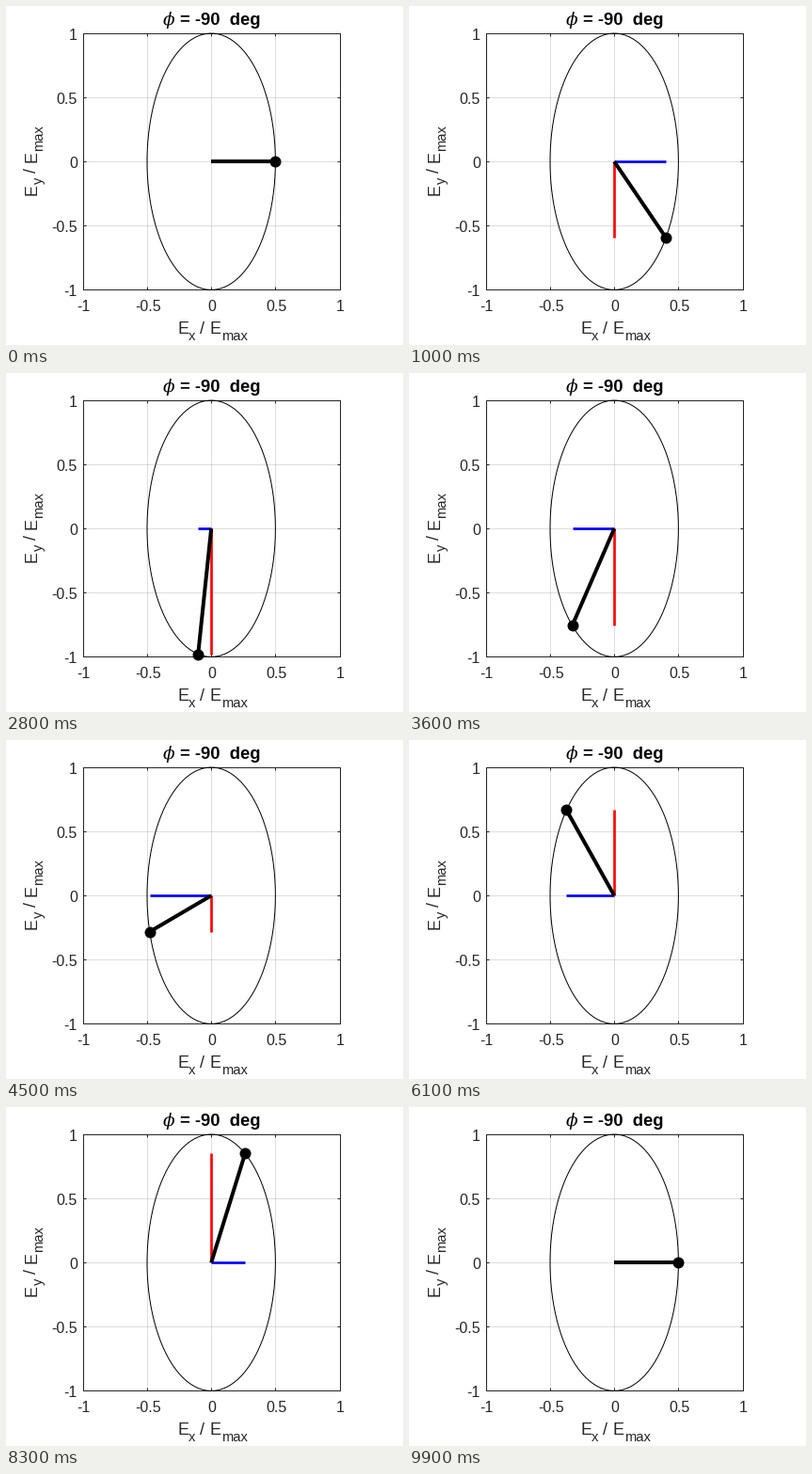
Animation of 422 by 360 pixels, one loop 10 s. Source, as a matplotlib script:

```python
import numpy as np
import matplotlib.pyplot as plt
from matplotlib.animation import FuncAnimation
from matplotlib.transforms import ScaledTranslation

W, H, DPI = 422, 360, 64
PX = 72 / DPI  # points per pixel
LEFT, TOP, RIGHT, BASE = 81.75, 29, 354.6, 301.45
STEPS = 100
INK = "#262626"
LABEL = 18 * PX

plt.rcParams.update({
    "font.family": "Liberation Sans",
    "axes.unicode_minus": False,
    "lines.solid_capstyle": "butt",
})

fig = plt.figure(figsize=(W / DPI, H / DPI), dpi=DPI, facecolor="white")
ax = fig.add_axes([LEFT / W, 1 - BASE / H,
                   (RIGHT - LEFT) / W, (BASE - TOP) / H])


def put(x, y, s, size=LABEL, **kw):
    """Place text with its baseline start at a pixel position, y downwards."""
    fig.text(x / W, 1 - y / H, s, fontsize=size, va="baseline",
             rotation_mode="anchor", **kw)


def field_label(x, y, axis, angle=0):
    """Write E_axis / E_max along the given angle."""
    em = LABEL / PX
    a = np.radians(angle)
    runs = [("E", 0, 0), (axis, 0.667, 1), ("/", 1.36, 0),
            ("E", 1.92, 0), ("max", 2.587, 1)]
    for s, shift, sub in runs:
        along, down = shift * em, 6.6 * sub
        put(x + along * np.cos(a) + down * np.sin(a),
            y - along * np.sin(a) + down * np.cos(a),
            s, LABEL * (0.82 if sub else 1), color=INK, rotation=angle)


def nudge(labels, dx, dy):
    """Shift tick labels by pixels, dy downwards."""
    move = ScaledTranslation(dx / DPI, -dy / DPI, fig.dpi_scale_trans)
    for label in labels:
        label.set_transform(label.get_transform() + move)


ticks = [-1, -0.5, 0, 0.5, 1]
names = [f"{t:g}" for t in ticks]
ax.set(xlim=(-1, 1), ylim=(-1, 1))
ax.set_xticks(ticks, names)
ax.set_yticks(ticks, names)
ax.set_axisbelow(True)
ax.grid(color=INK, alpha=0.15, lw=PX)
ax.tick_params(direction="in", top=True, right=True, length=2.7 * PX,
               width=PX, color=INK, labelcolor=INK, labelsize=16 * PX)
ax.tick_params(axis="x", pad=10.8 * PX)
ax.tick_params(axis="y", pad=6 * PX)
nudge(ax.get_xticklabels(), 0.7, 0)
nudge(ax.get_yticklabels(), 0, 1)
for spine in ax.spines.values():
    spine.set(color=INK, linewidth=PX)

put(166.5, 20, "ϕ", 18.5 * PX, family="DejaVu Serif", style="italic")
put(270.5, 20, "= -90  deg", 18.4 * PX, weight="bold", ha="right")
field_label(182, 348, "x")
field_label(32, 201, "y", 90)

theta = np.linspace(0, 2 * np.pi, STEPS)
ex, ey = 0.5 * np.cos(theta), -np.sin(theta)


def line(color, width, z):
    return ax.plot([], [], color=color, lw=width * PX, zorder=z,
                   clip_on=False)[0]


ax.plot(ex, ey, color="black", lw=PX, zorder=3, clip_on=False)
x_part = line("blue", 2.67, 4)
y_part = line("red", 2.67, 5)
vector = line("black", 4, 6)
tip, = ax.plot([], [], "o", color="black", ms=12 * PX, mew=0, zorder=7,
               clip_on=False)


def update(i):
    x, y = ex[i], ey[i]
    x_part.set_data([0, x], [0, 0])
    y_part.set_data([0, 0], [0, y])
    vector.set_data([0, x], [0, y])
    tip.set_data([x], [y])
    return x_part, y_part, vector, tip


anim = FuncAnimation(fig, update, frames=STEPS, interval=100,
                     repeat=True, repeat_delay=0, blit=False)
plt.show()
```
